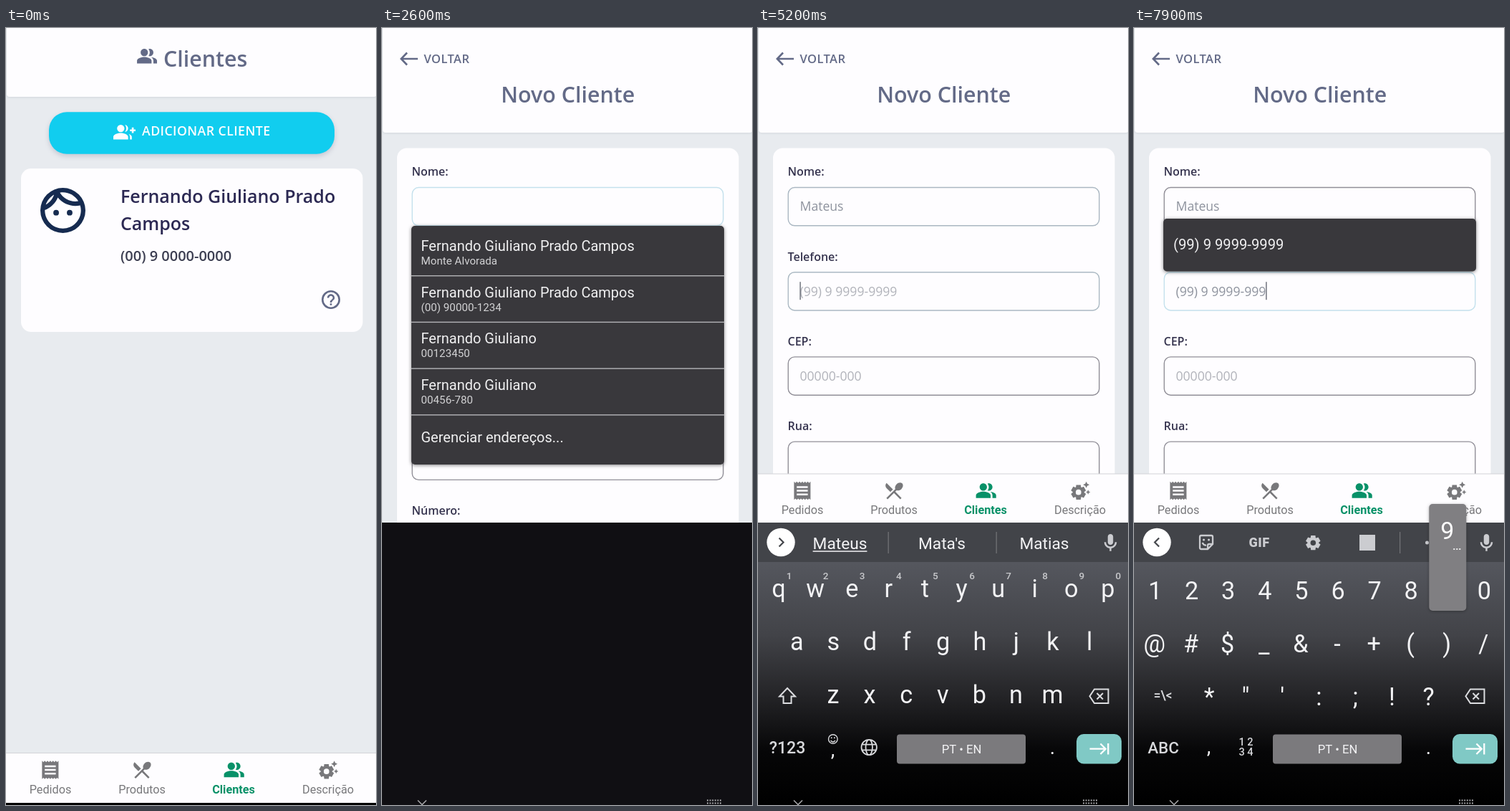
Recreate the animation shown at these times as an HTML page with a canvas. Size 517 by 1084 pixels, loop 8 s.

```html
<!DOCTYPE html>
<html lang="pt">
<head>
<meta charset="utf-8">
<title>Novo Cliente</title>
<style>
html, body { margin: 0; width: 100%; height: 100%; overflow: hidden; background: #000; }
canvas { display: block; width: 517px; height: 1084px; }
</style>
</head>
<body>
<canvas id="stage"></canvas>
<script>
const W = 517, H = 1084, LOOP = 8000;
const canvas = document.getElementById('stage');
const ctx = canvas.getContext('2d');
const dpr = window.devicePixelRatio || 1;
canvas.width = W * dpr;
canvas.height = H * dpr;

const SANS = '"Open Sans", sans-serif', ROBOTO = 'Roboto, sans-serif';
const WHITE = '#fefdff', PAGE = '#e8ebef', SLATE = '#636a87', GREEN = '#089168', GREY = '#78787b';
const KEY = '#f3f3f5', TOOL = '#cbccd0';

// Icons on a 24 unit grid
const ICON = {
  people: 'M16.67 13.13C18.04 14.06 19 15.32 19 17v3h4v-3c0-2.18-3.57-3.47-6.33-3.87zM15 12c2.21 0 4-1.79 4-4s-1.79-4-4-4c-.47 0-.91.1-1.33.24C14.5 5.27 15 6.58 15 8s-.5 2.73-1.33 3.76c.42.14.86.24 1.33.24zM9 12c2.21 0 4-1.79 4-4s-1.79-4-4-4-4 1.79-4 4 1.79 4 4 4zm0 1c-2.67 0-8 1.34-8 4v3h16v-3c0-2.66-5.33-4-8-4z',
  add: 'M22 9V7h-2v2h-2v2h2v2h2v-2h2V9zM8 12a4 4 0 1 0 0-8 4 4 0 1 0 0 8zM8 13c-2.67 0-8 1.34-8 4v3h16v-3c0-2.66-5.33-4-8-4zM12.51 4.05C13.43 5.11 14 6.49 14 8s-.57 2.89-1.49 3.95C14.47 11.7 16 10.04 16 8s-1.53-3.7-3.49-3.95zM16.53 13.83C17.42 14.66 18 15.7 18 17v3h2v-3c0-1.45-1.59-2.51-3.47-3.17z',
  receipt: 'M18 17H6v-2h12v2zm0-4H6v-2h12v2zm0-4H6V7h12v2zM3 22l1.5-1.5L6 22l1.5-1.5L9 22l1.5-1.5L12 22l1.5-1.5L15 22l1.5-1.5L18 22l1.5-1.5L21 22V2l-1.5 1.5L18 2l-1.5 1.5L15 2l-1.5 1.5L12 2l-1.5 1.5L9 2 7.5 3.5 6 2 4.5 3.5 3 2z',
  cutlery: 'M8.1 13.34l2.83-2.83L3.91 3.5c-1.56 1.56-1.56 4.09 0 5.66zm6.78-1.81c1.53.71 3.68.21 5.27-1.38 1.91-1.91 2.28-4.65.81-6.12-1.46-1.46-4.2-1.1-6.12.81-1.59 1.59-2.09 3.74-1.38 5.27L3.7 19.87l1.41 1.41L12 14.41l6.88 6.88 1.41-1.41L13.41 13z',
  gear: 'M16.24 14l1.94 1.47-2.5 4.33-2.24-.94c-.2.13-.42.26-.64.37l-.3 2.4h-5l-.3-2.41c-.22-.11-.43-.23-.64-.37l-2.24.94-2.5-4.33L3.76 14q-.02-.37 0-.74l-1.94-1.47 2.5-4.33 2.24.94c.2-.13.42-.26.64-.37l.3-2.4h5l.3 2.41c.22.11.43.23.64.37l2.24-.94 2.5 4.33-1.94 1.47q.02.37 0 .74zM10 10.63a3 3 0 1 0 0 6 3 3 0 1 0 0-6z',
  sparks: 'M17.41 6.59L15 5.5l2.41-1.09L18.5 2l1.09 2.41L22 5.5l-2.41 1.09L18.5 9zM21.28 12.72L20.5 11l-.78 1.72-1.72.78 1.72.78.78 1.72.78-1.72L23 13.5z',
  help: 'M11 18h2v-2h-2zM12 2a10 10 0 1 0 0 20 10 10 0 1 0 0-20zM12 4a8 8 0 1 1 0 16 8 8 0 1 1 0-16zM12 6c-2.21 0-4 1.79-4 4h2c0-1.1.9-2 2-2s2 .9 2 2c0 2-3 1.75-3 5h2c0-2.25 3-2.5 3-5 0-2.21-1.79-4-4-4z',
  face: 'M9 11.75a1.25 1.25 0 1 0 0 2.5 1.25 1.25 0 1 0 0-2.5zM15 11.75a1.25 1.25 0 1 0 0 2.5 1.25 1.25 0 1 0 0-2.5zM12 2a10 10 0 1 0 0 20 10 10 0 1 0 0-20zM10.66 4.12C12.06 6.44 14.6 8 17.5 8c.46 0 .91-.05 1.34-.12C17.44 5.56 14.9 4 12 4c-.46 0-.91.05-1.34.12zM4.42 9.47c1.71-.97 3.03-2.55 3.66-4.44C6.37 6 5.05 7.58 4.42 9.47zM20 12c0-.78-.12-1.53-.33-2.24-.7.15-1.42.24-2.17.24-3.13 0-5.92-1.44-7.76-3.69C8.69 8.87 6.6 10.88 4 11.86V12c0 4.41 3.59 8 8 8s8-3.59 8-8z',
  mic: 'M12 14c1.66 0 3-1.34 3-3V5c0-1.66-1.34-3-3-3S9 3.34 9 5v6c0 1.66 1.34 3 3 3zm5-3c0 2.76-2.24 5-5 5s-5-2.24-5-5H5c0 3.53 2.61 6.43 6 6.92V21h2v-3.08c3.39-.49 6-3.39 6-6.92z'
};
for (const k in ICON) ICON[k] = new Path2D(ICON[k]);

const clamp = v => Math.max(0, Math.min(1, v));
const ramp = (t, a, b) => clamp((t - a) / (b - a));
const mix = (a, b, k) => `rgb(${a.map((v, i) => Math.round(v + (b[i] - v) * k))})`;

function icon(name, x, y, scale, color) {
  ctx.save();
  ctx.translate(x, y);
  ctx.scale(scale, scale);
  ctx.fillStyle = color;
  ctx.fill(ICON[name], 'evenodd');
  ctx.restore();
}

function text(s, x, y, size, color, { font = ROBOTO, weight = 400, align = 'left', gap = 0 } = {}) {
  ctx.font = `${weight} ${size}px ${font}`;
  ctx.textAlign = align;
  ctx.letterSpacing = gap + 'px';
  ctx.fillStyle = color;
  ctx.fillText(s, x, y);
  return ctx.measureText(s).width;
}

function rect(x, y, w, h, color) {
  ctx.fillStyle = color;
  ctx.fillRect(x, y, w, h);
}

function box(x, y, w, h, r, color, shadow) {
  ctx.save();
  if (shadow) {
    ctx.shadowColor = shadow[0];
    ctx.shadowBlur = shadow[1] * dpr;
    ctx.shadowOffsetY = shadow[2] * dpr;
  }
  ctx.fillStyle = color;
  ctx.beginPath();
  ctx.roundRect(x, y, w, h, r);
  ctx.fill();
  ctx.restore();
}

function disc(x, y, r, color) {
  ctx.fillStyle = color;
  ctx.beginPath();
  ctx.arc(x, y, r, 0, 7);
  ctx.fill();
}

function stroke(d, color, width) {
  ctx.strokeStyle = color;
  ctx.lineWidth = width;
  ctx.stroke(new Path2D(d));
}

function header(h) {
  rect(0, 0, W, H, PAGE);
  box(1, -10, W, h + 10, 4, WHITE, ['rgba(60,70,90,.12)', 3, 1]);
}

function tabs(y) {
  rect(0, y - 1, W, 1.5, '#d3d4d8');
  rect(0, y, W, 69, WHITE);
  const s = 1.28, top = y + 7.7;
  icon('receipt', 46.5, top, s, GREY);
  icon('cutlery', 174.6, top, s, GREY);
  icon('people', 303.3, top, s, GREEN);
  icon('gear', 435, top, s, GREY);
  icon('sparks', 435, top, s, GREY);
  [['Pedidos', 62], ['Produtos', 190], ['Clientes', 318], ['Descrição', 450]].forEach(([s, x], i) =>
    text(s, x, y + 55.5, 16.2, i === 2 ? GREEN : GREY, { weight: i === 2 ? 700 : 400, align: 'center' }));
}

function clientList(t) {
  header(96);
  icon('people', 181.8, 24, 1.27, SLATE);
  text('Clientes', 220, 54, 30.4, SLATE, { font: SANS, weight: 600 });

  const k = ramp(t, 1480, 1600), y = 117.3 - k;
  const fill = ctx.createLinearGradient(0, y, 0, y + 58);
  fill.addColorStop(0, mix([17, 205, 239], [37, 189, 218], k));
  fill.addColorStop(1, mix([17, 205, 239], [47, 177, 201], k));
  box(60, y, 399, 58.4, 25, fill, ['rgba(50,50,93,.2)', 7, 3]);
  icon('add', 150, y + 12.5, 1.29, WHITE);
  text('ADICIONAR CLIENTE', 190, y + 32.4, 17.7, WHITE, { font: SANS, weight: 600, gap: 0.45 });

  box(21, 196, 477.5, 228, 14, WHITE);
  icon('face', 41.7, 216.7, 3.15, '#162b50');
  text('Fernando Giuliano Prado', 160, 244, 25, '#2c2953', { font: SANS, weight: 600 });
  text('Campos', 160, 281.5, 25, '#2c2953', { font: SANS, weight: 600 });
  text('(00) 9 0000-0000', 160, 325, 20, '#3d3f52', { font: SANS, weight: 600 });
  icon('help', 438.4, 363.4, 1.3, SLATE);
  tabs(1012);
}

// Form and typing
const NAME = 'Mateus', MASK = '(99) 9 9999-9999';
const OPEN = 1850, NEXT = 5130, DIGITS = 6400, BEAT = 160;
const TYPED = [3230, 3500, 3720, 3930, 4180, 4520];
const HINTS = [
  ['M', 'Mas', 'Mais'], ['Ma', 'Mas', 'Mais'], ['Mat', 'Mato', 'Mata'],
  ['Mate', 'Mates', 'Matei'], ['Mateu', 'Mateus', 'Mate'], ['Mateus', "Mata's", 'Matias']
];
const LABELS = ['Nome', 'Telefone', 'CEP', 'Rua', 'Número', 'Bairro', 'Cidade'];
const IDLE = [145, 143, 152], FOCUS = [196, 225, 237];
const STEP = 118.2;

const digitCount = t => t < DIGITS ? 0 : Math.floor((t - DIGITS) / BEAT) + 1;

function maskText(n) {
  let out = '';
  for (const c of MASK) {
    if (c === '9' && n-- <= 0) break;
    out += c;
  }
  return out.replace(/\D+$/, '');
}

function caret(t, since, row, x) {
  if (Math.floor((t - since) / 500) % 2 === 0) rect(x, 236 + row * STEP, 1.5, 25, '#70747e');
}

function fieldText(s, row, color) {
  return text(s, 58.5, 255.3 + row * STEP, 17.6, color, { font: SANS });
}

function form(t) {
  header(146);
  stroke('M50 43H27M35 34.5L26.8 43L35 51.5', SLATE, 2.6);
  text('VOLTAR', 58.5, 49, 16.5, SLATE, { font: SANS, weight: 600, gap: 0.42 });
  text('Novo Cliente', 259.7, 104, 30.4, SLATE, { font: SANS, weight: 600, align: 'center' });
  box(21, 167.5, 477.5, 1000, 14, WHITE);

  const swap = ramp(t, NEXT, NEXT + 140);
  const focus = [ramp(t, OPEN, OPEN + 220) * (1 - swap), swap];
  LABELS.forEach((label, i) => {
    const y = i * STEP;
    text(label + ':', 41.5, 206.4 + y, 16, '#36344f', { font: SANS, weight: 600 });
    ctx.strokeStyle = mix(IDLE, FOCUS, focus[i] || 0);
    ctx.lineWidth = 1.4;
    ctx.beginPath();
    ctx.roundRect(42.2, 222.5 + y, 434.6, 53.3, 9);
    ctx.stroke();
  });

  const INK = '#8d929d', FAINT = '#b1b3ba';
  const n = TYPED.filter(at => t >= at).length;
  const nameW = fieldText(NAME.slice(0, n), 0, INK);
  if (t < NEXT) {
    if (n) rect(58.5, 259.5, nameW, 1.2, INK);
    caret(t, n ? TYPED[n - 1] : 1800, 0, 58.3 + nameW);
  }
  const count = digitCount(t);
  const value = maskText(count);
  const phoneW = fieldText(value || MASK, 1, value ? INK : FAINT);
  if (t >= NEXT) {
    const at = !count ? 0 : count === 1 ? ctx.measureText('(').width : phoneW;
    caret(t, count ? DIGITS + (count - 1) * BEAT : 5190, 1, 58.3 + at);
  }
  fieldText('00000-000', 2, FAINT);
}

const MENU = '#39383c', MENU_SHADOW = ['rgba(0,0,0,.5)', 5, 1];

function contactMenu() {
  box(41, 276, 437, 333, 5, MENU, MENU_SHADOW);
  [
    ['Fernando Giuliano Prado Campos', 'Monte Alvorada'],
    ['Fernando Giuliano Prado Campos', '(00) 90000-1234'],
    ['Fernando Giuliano', '00123450'],
    ['Fernando Giuliano', '00456-780']
  ].forEach(([a, b], i) => {
    const y = i * 64.7;
    text(a, 54.5, 311 + y, 20, '#f0f0f1');
    text(b, 54.5, 330 + y, 15.2, '#d2d2d4');
    rect(41, 345 + y, 437, 1.4, '#b4b4b7');
  });
  text('Gerenciar endereços...', 54.5, 578, 20, '#f0f0f1');
}

function phoneMenu() {
  box(41, 266, 437, 73.5, 5, MENU, MENU_SHADOW);
  text(MASK, 55, 309, 20.2, '#f0f0f1');
}

// Keyboard
const PITCH = 51.1;
const LETTERS = [['qwertyuiop', 29], ['asdfghjkl', 54.3], ['zxcvbnm', 105]];
const SIGNS = [['1234567890', 29.5], ['@#$_&-+()/', 28.5], ['*"\':;!?', 105]];
const center = { align: 'center' };
const middle = { weight: 500, align: 'center' };

function keyAt(rows, c) {
  const r = rows.findIndex(([keys]) => keys.includes(c));
  return [rows[r][1] + rows[r][0].indexOf(c) * PITCH, 785 + r * 74];
}

function popup(rows, c, label, dots) {
  const [x, y] = keyAt(rows, c);
  box(x - 26, y - 121, 52, 149, 5, '#807f82', ['rgba(0,0,0,.3)', 4, 1]);
  text(label, x - 0.5, y - 72, 34, '#fff', center);
  if (dots) for (let i = -1; i < 2; i++) rect(x + 12 + i * 4, y - 59, 2, 2, '#eee');
}

function strip(hints) {
  disc(32, 717.5, 19.7, '#fff');
  stroke(hints ? 'M29.5 711.5L35.5 717.5L29.5 723.5' : 'M35 711.5L29 717.5L35 723.5', '#45474c', 2.2);
  icon('mic', 477.5, 703.6, 1.25, TOOL);
  if (hints) {
    rect(181.5, 703, 1.3, 30, '#707276');
    rect(332.5, 703, 1.3, 30, '#707276');
    hints.forEach((s, i) => {
      const x = [114.5, 257, 400][i];
      const w = text(s, x, 727, 22.7, KEY, center);
      if (!i) rect(x - w / 2, 729.3, w, 1.5, KEY);
    });
    return;
  }
  stroke('M94 708H108Q110 708 110 710V720L103 727H94Q92 727 92 725V710Q92 708 94 708ZM110 720H105Q103 720 103 722V727M95.5 718Q97.5 722 101 721.5', TOOL, 2.3);
  disc(97.5, 714, 1.6, TOOL);
  disc(104.5, 714, 1.6, TOOL);
  text('GIF', 175, 724, 18, TOOL, { weight: 800, align: 'center', gap: 0.5 });
  icon('gear', 237.7, 701, 1.26, TOOL);
  rect(315, 707, 22, 22, TOOL);
  rect(371, 703, 1.3, 30, '#707276');
  [409.5, 417.5, 425.5].forEach(x => disc(x, 718, 2.5, TOOL));
}

function keys(signs, upper) {
  (signs ? SIGNS : LETTERS).forEach(([row, x0], r) => {
    [...row].forEach((c, i) => {
      const x = x0 + i * PITCH;
      text(upper ? c.toUpperCase() : c, x, (signs ? 797 : 794) + r * 73.8, 34.2, KEY, center);
      if (!signs && !r) text((i + 1) % 10, x + 14.5, 769, 13.5, '#c8c9cc', middle);
    });
  });
  stroke('M470 922.5H489.5V942H470L463.5 932.2ZM473.5 928L482 936.5M482 928L473.5 936.5', '#dcdde0', 2);
  if (signs) {
    text('=\\<', 40.5, 937, 17.5, '#d8d9dc', middle);
    text('ABC', 41, 1012, 22.3, '#d8d9dc', middle);
    text('1 2', 156.5, 1001, 14.5, '#d8d9dc', middle);
    text('3 4', 156.5, 1015, 14.5, '#d8d9dc', middle);
  } else {
    const shift = 'M41 921L52 932.5H46.5V942H35.5V932.5H30Z';
    stroke(shift, '#dcdde0', 2);
    if (upper) { ctx.fillStyle = '#dcdde0'; ctx.fill(new Path2D(shift)); }
    text('?123', 41, 1012, 23, '#d8d9dc', middle);
    stroke('M98.5 992a6.3 6.3 0 1 0 12.6 0a6.3 6.3 0 1 0 -12.6 0M101.5 994Q104.8 998 108 994', '#d8d9dc', 1.4);
    disc(102.7, 990.3, 1, '#d8d9dc');
    disc(106.9, 990.3, 1, '#d8d9dc');
    stroke('M144.5 1003.5a10.7 10.7 0 1 0 21.4 0a10.7 10.7 0 1 0 -21.4 0M150.5 1003.5a4.7 10.7 0 1 0 9.4 0a4.7 10.7 0 1 0 -9.4 0M146 999.7H164.5M146 1007.3H164.5', '#d8d9dc', 1.8);
  }
  text(',', 104.5, signs ? 1012 : 1016, 28, KEY, center);
  box(194, 985.5, 180, 41, 4, '#7b7a7d');
  text('PT • EN', 284.5, 1012, 16.6, KEY, center);
  text('.', 411.5, 1013, 28, KEY, center);
  box(445, 985, 63, 41.5, 10, '#80c9c5');
  stroke('M463.5 1005.7H485M478.5 998.5L485.7 1005.7L478.5 1013M489.3 998V1013.5', '#fff', 2.3);
}

function keyboard(t) {
  const top = 1080 - 390 * ramp(t, 2420, 2570);
  rect(0, top, W, H - top, '#100f13');
  ctx.globalAlpha = ramp(t, 2620, 2780);
  if (ctx.globalAlpha > 0) {
    const shade = ctx.createLinearGradient(0, 745, 0, H);
    [['#55575e', 0], ['#424348', 0.3], ['#242427', 0.55], ['#060607', 0.78], ['#000', 1]]
      .forEach(([c, at]) => shade.addColorStop(at, c));
    rect(0, 745, W, H - 745, shade);
    rect(0, 690, W, 55, '#424449');
    const n = TYPED.filter(at => t >= at).length;
    strip(n && t < 5250 ? HINTS[n - 1] : null);
    keys(t >= 5800, t < TYPED[0]);
  }
  ctx.globalAlpha = 1;
  stroke('M50 1077.5L56 1083.5L62 1077.5', '#a5a5a8', 1.6);
  for (let i = 0; i < 12; i++) rect(454 + (i % 6) * 3.6, 1076.5 + Math.floor(i / 6) * 4, 2, 2, '#a5a5a8');
}

function pressedKey(t) {
  const i = TYPED.findIndex(at => t >= at - 120 && t < at + 20);
  if (i >= 0) popup(LETTERS, NAME[i].toLowerCase(), NAME[i], false);
  const phase = (t - DIGITS) % BEAT;
  if (t > DIGITS && phase > 40 && phase < 135) popup(SIGNS, '9', '9', true);
}

function draw(t) {
  ctx.setTransform(dpr, 0, 0, dpr, 0, 0);
  if (t < OPEN) {
    clientList(t);
  } else {
    form(t);
    if (t >= 2550 && t < TYPED[0]) contactMenu();
    if (t >= 6600 && !(t >= 7250 && t < 7350)) phoneMenu();
    tabs(t < 2650 ? 1012 : 622.5);
  }
  rect(0, 1081, W, 3, '#000');
  if (t >= 2420) {
    keyboard(t);
    pressedKey(t);
  }
}

function frame(now) {
  draw(now % LOOP);
  requestAnimationFrame(frame);
}
requestAnimationFrame(frame);
</script>
</body>
</html>
```
